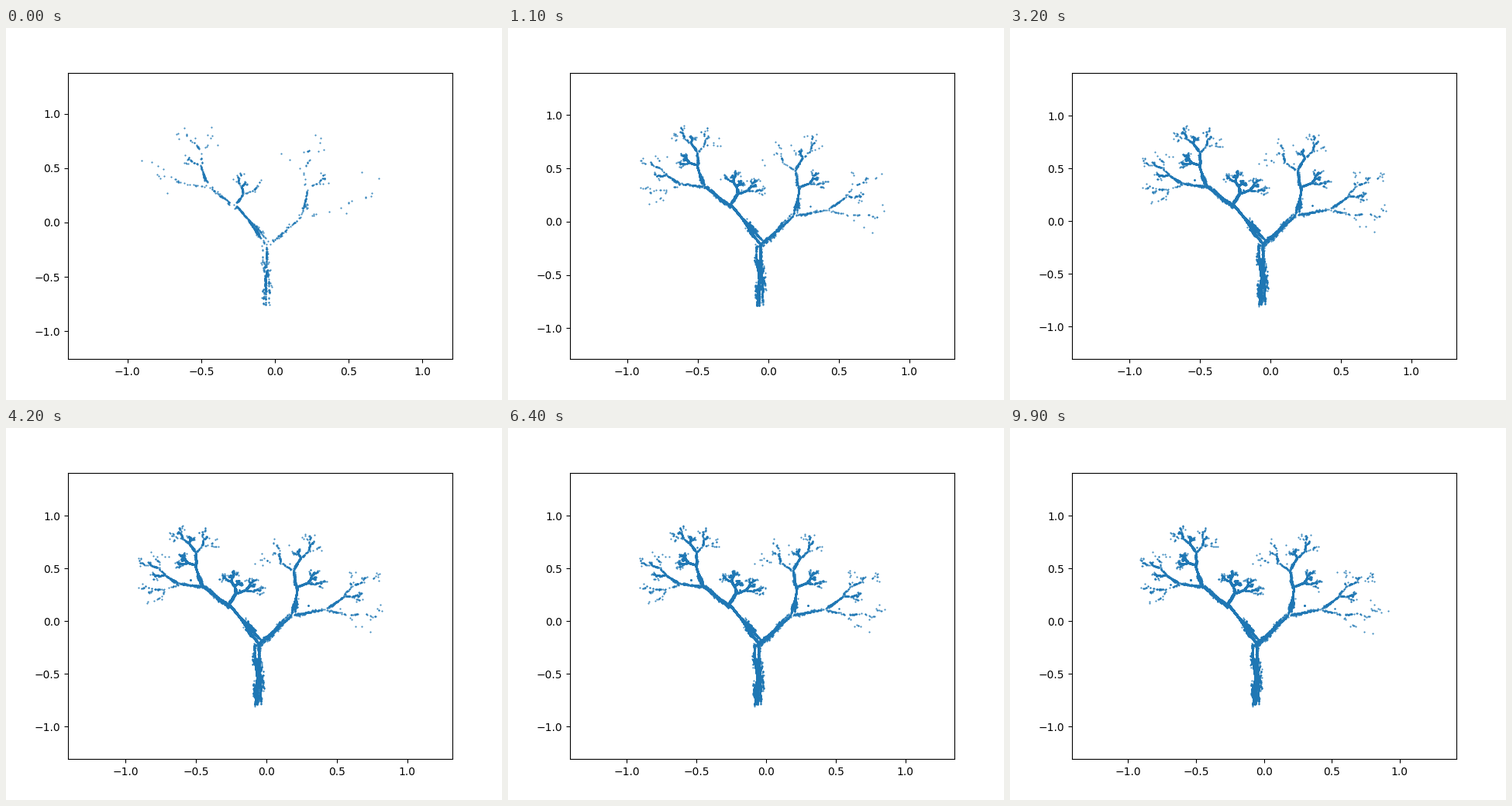
Recreate the animation shown at these times as a matplotlib script. Size 640 by 480 pixels, loop 10 s.

```python
import numpy as np
import matplotlib.pyplot as plt
from matplotlib.animation import FuncAnimation

FRAMES = 100
INTERVAL = 100
MARGIN = 0.5


def affine(a, b, c, d, e, f):
    return np.array([[a, b], [c, d]]), np.array([e, f])


def stem(foot, top, width):
    """Squash the whole tree, upside down, into a thin stem."""
    foot, top = np.array(foot), np.array(top)
    low, high = -0.82, 0.905
    along = (foot - top) / (high - low)
    across = width * np.array([-along[1], along[0]]) / np.hypot(*along)
    return np.column_stack([across, along]), top - low * along


# Weight and map of each part of the tree
PARTS = [
    (0.13, affine(0.545, 0.42, -0.355, 0.52, 0.298, 0.147)),   # right bough
    (0.16, affine(-0.33, -0.335, -0.315, 0.36, -0.54, 0.39)),  # left bough
    (0.15, affine(0.19, 0.08, -0.06, 0.165, -0.19, 0.294)),    # inner bough
    (0.30, stem((-0.042, -0.196), (-0.265, 0.165), 0.035)),    # left limb
    (0.19, stem((-0.053, -0.82), (-0.053, -0.2), 0.047)),      # trunk
    (0.07, stem((-0.06, -0.2), (-0.06, -0.8), -0.047)),        # bark
]


def walk(steps, rng):
    """Chaos game: from the origin, apply a random map at each step."""
    weights = [w for w, _ in PARTS]
    p = np.zeros(2)
    path = []
    for k in rng.choice(len(PARTS), size=steps, p=weights):
        matrix, shift = PARTS[k][1]
        p = matrix @ p + shift
        path.append(p)
    return path


def grow(rng):
    """Return all points and how many are visible in each frame."""
    points, counts = [], []
    for i in range(FRAMES):
        points += walk(int(1350 * np.exp(-i / 25)) + 40, rng)
        counts.append(len(points))
    return np.array(points), counts


points, counts = grow(np.random.default_rng(7))

fig, ax = plt.subplots(figsize=(6.4, 4.8), dpi=100)
dots, = ax.plot([], [], ".", color="tab:blue", markersize=1)


def update(i):
    shown = points[:counts[i]]
    dots.set_data(*shown.T)
    (x0, y0), (x1, y1) = shown.min(axis=0) - MARGIN, shown.max(axis=0) + MARGIN
    ax.set_xlim(x0, x1)
    ax.set_ylim(y0, y1)
    return dots,


anim = FuncAnimation(fig, update, frames=FRAMES, interval=INTERVAL,
                     repeat=True, repeat_delay=0)
plt.show()
```
